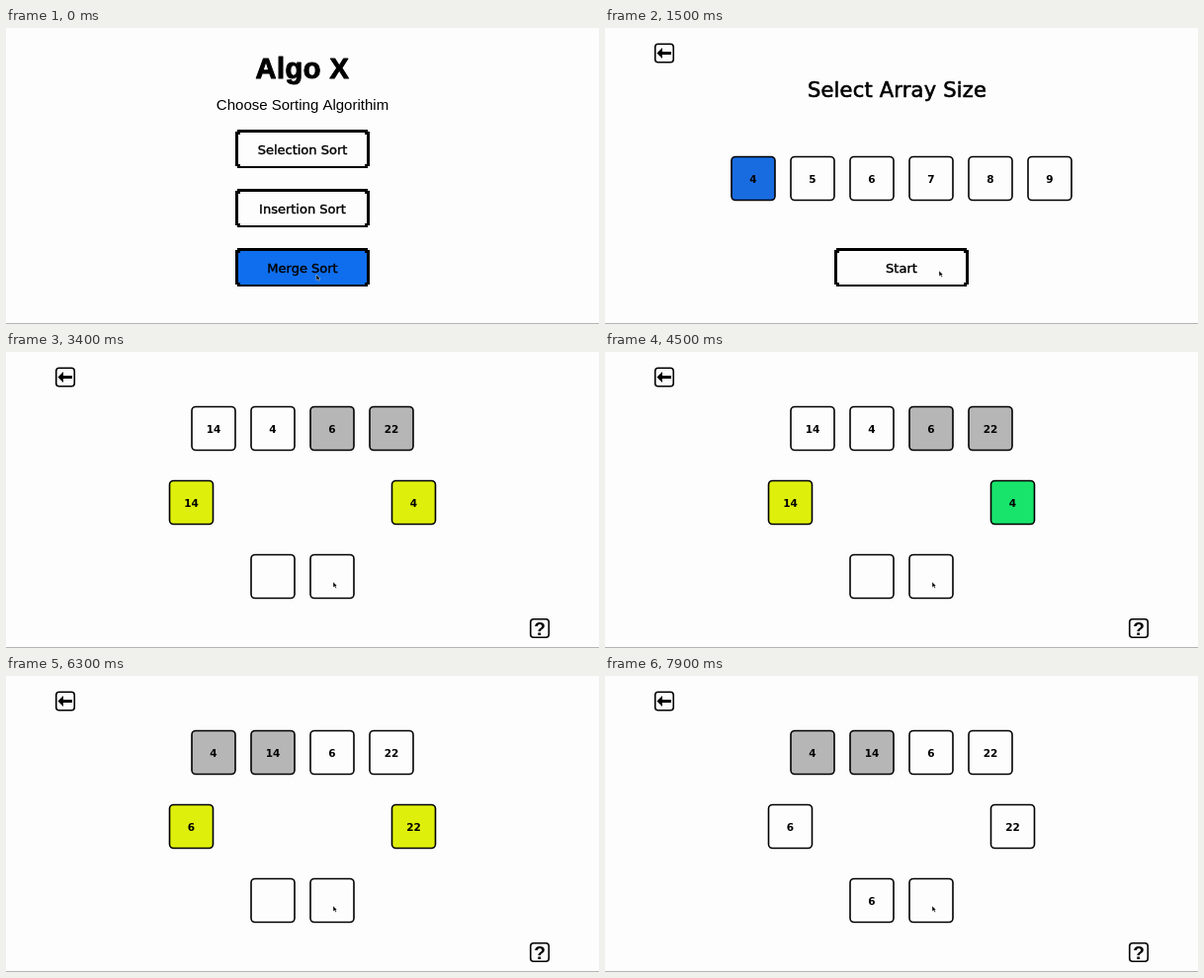
These frames come from a looping animation (600x300 px, 8 s). An HTML page with a canvas:

```html
<!DOCTYPE html>
<html lang="en">
<head>
<meta charset="utf-8">
<title>Sorting visualizer</title>
<style>
html, body { margin: 0; width: 100%; height: 100%; overflow: hidden; background: #fdfdfd; }
canvas { display: block; }
</style>
</head>
<body>
<canvas id="stage" width="600" height="300"></canvas>
<script>
const ctx = document.getElementById('stage').getContext('2d');
const LOOP = 8000, STEP = 100;
const SIZES_AT = 1300, MERGE_AT = 2600;
const NARROW = '"Liberation Sans", Arial, sans-serif';
const WIDE = '"DejaVu Sans", Verdana, sans-serif';
const INK = '#000', PAPER = '#fdfdfd', GREY = '#b6b6b6';
const BLUE = '#0f6eee', PICKED = '#196ce0', YELLOW = '#dfef0c', GREEN = '#18e46c';

const values = [14, 4, 6, 22];
const ascending = list => [...list].sort((a, b) => a - b);

// Merge rounds: pick one box per BEAT, then flash the merged pair
const FIRST_ROUND = 3300, ROUND = 3000, LEAD = 200;
const BEAT = 700, FLASH = 200, SETTLE = 600;

function rect(x, y, w, h, color) {
  ctx.fillStyle = color;
  ctx.fillRect(x, y, w, h);
}

function text(str, x, y, font, spacing = 0, weight = 0) {
  ctx.font = font;
  ctx.letterSpacing = spacing + 'px';
  ctx.textAlign = 'center';
  ctx.fillStyle = ctx.strokeStyle = INK;
  ctx.fillText(str, x, y);
  if (weight) {
    ctx.lineWidth = weight;
    ctx.lineJoin = 'round';
    ctx.strokeText(str, x, y);
  }
}

function poly(points, color) {
  ctx.beginPath();
  points.forEach(([x, y]) => ctx.lineTo(x, y));
  ctx.closePath();
  ctx.fillStyle = color;
  ctx.fill();
}

function frame(cx, cy, size, color, radius = 3) {
  ctx.beginPath();
  ctx.roundRect(cx - size / 2, cy - size / 2, size, size, radius);
  ctx.fillStyle = color;
  ctx.fill();
  ctx.lineWidth = 1.6;
  ctx.strokeStyle = INK;
  ctx.stroke();
}

function cell(cx, cy, value, color) {
  frame(cx, cy, 44, color, 4);
  text(value, cx, cy + 4, 'bold 10.5px ' + WIDE);
}

function button(label, cy, hot) {
  const top = cy - 19.5, fill = hot ? BLUE : PAPER;
  rect(234, top, 132, 39, INK);
  rect(232, top + 2, 136, 35, INK);
  rect(237, top + 3, 126, 34, fill);
  rect(235, top + 5, 130, 30, fill);
  text(label, 300, cy + 5, '13px ' + WIDE, 0, 0.4);
}

function backButton() {
  frame(60, 25.5, 18.5, PAPER);
  rect(56, 24, 11, 3, INK);
  poly([[52.5, 25.5], [58, 20], [58, 31]], INK);
}

const within = (p, cx, cy, w, h) =>
  Math.abs(p.x - cx) < w / 2 && Math.abs(p.y - cy) < h / 2;

function menu(p) {
  text('Algo X', 300, 51, 'bold 29px ' + NARROW, 0.5, 1);
  text('Choose Sorting Algorithim', 300, 83, '15px ' + NARROW);
  ['Selection', 'Insertion', 'Merge'].forEach((name, i) => {
    const cy = 122.5 + 60 * i;
    button(name + ' Sort', cy, within(p, 300, cy, 134, 36));
  });
}

function sizes(p, t) {
  backButton();
  text('Select Array Size', 295.5, 70, '21px ' + WIDE, 0.2, 0.6);
  for (let n = 4; n < 10; n++) {
    const cx = 150 + 60 * (n - 4);
    cell(cx, 152.5, n, n === 4 || within(p, cx, 152.5, 44, 44) ? PICKED : PAPER);
  }
  const moved = t > SIZES_AT + 300;
  button('Start', 242.5, moved && within(p, 300, 242.5, 132, 33));
}

// Green on every other beat until the time is up
const flash = (t, length) =>
  t >= 0 && t < length && Math.floor(t / FLASH) % 2 === 0;

function merge(t) {
  const round = Math.max(0, Math.floor((t - FIRST_ROUND + LEAD) / ROUND));
  const u = t - FIRST_ROUND - round * ROUND;
  const from = round * 2;
  const row = [...ascending(values.slice(0, from)), ...values.slice(from)];
  const pair = row.slice(from, from + 2);
  const order = ascending(pair);

  backButton();
  row.forEach((v, i) => {
    const active = t < MERGE_AT + 400 || Math.floor(i / 2) === round;
    cell(210 + 60 * i, 77.5, v, active ? PAPER : GREY);
  });

  pair.forEach((v, i) => {
    const pick = BEAT * (order.indexOf(v) + 1);
    const fresh = u >= 0 && u < BEAT + SETTLE;
    const color = flash(u - pick, SETTLE) ? GREEN
      : fresh && u < pick ? YELLOW : PAPER;
    cell(187.5 + 225 * i, 152.5, u < -100 ? '' : v, color);
  });

  order.forEach((v, i) => {
    const placed = u >= BEAT * (i + 1) + SETTLE;
    cell(270 + 60 * i, 227.5, placed ? v : '', flash(u - 3 * BEAT, 500) ? GREEN : PAPER);
  });

  frame(540, 280, 18.5, PAPER);
  text('?', 540, 287, 'bold 19px ' + NARROW);
}

// Pointer stops on the size screen: time, x, y
const stops = [
  [1600, 338, 246], [1900, 150, 160], [2200, 390, 150],
  [2300, 452, 190], [2400, 335, 225], [2600, 331, 233]
];

function pointerAt(t) {
  if (t < 200) return { x: 314, y: 250 };
  if (t < 400) return { x: 327, y: 240 };
  if (t < 1200) {
    const a = Math.PI * (t - 300) / 900;
    return { x: 338 - 46 * Math.sin(2 * a), y: 246 - 125 * Math.sin(a) };
  }
  const i = stops.findIndex(s => s[0] > t);
  const [t1, x1, y1] = stops.at(i), [t0, x0, y0] = stops.at(i < 1 ? i : i - 1);
  const p = t1 > t0 ? (t - t0) / (t1 - t0) : 0;
  return { x: x0 + (x1 - x0) * p, y: y0 + (y1 - y0) * p };
}

function pointer({ x, y }) {
  const shape = [[0, 0], [0, 5.5], [1.4, 4.5], [2.6, 6.5], [3.4, 6], [2.6, 4], [4, 4]];
  poly(shape.map(([dx, dy]) => [x + dx, y + dy]), INK);
  ctx.lineWidth = 0.4;
  ctx.strokeStyle = '#fff';
  ctx.stroke();
}

function draw(now) {
  const t = Math.floor(now % LOOP / STEP) * STEP;
  const p = pointerAt(t);
  rect(0, 0, 600, 300, PAPER);
  if (t < SIZES_AT) menu(p);
  else if (t < MERGE_AT) sizes(p, t);
  else merge(t);
  pointer(p);
  rect(0, 299, 600, 1, '#b4b4b4');
}

const start = performance.now();
function tick() {
  draw(performance.now() - start);
  requestAnimationFrame(tick);
}
tick();
</script>
</body>
</html>
```
